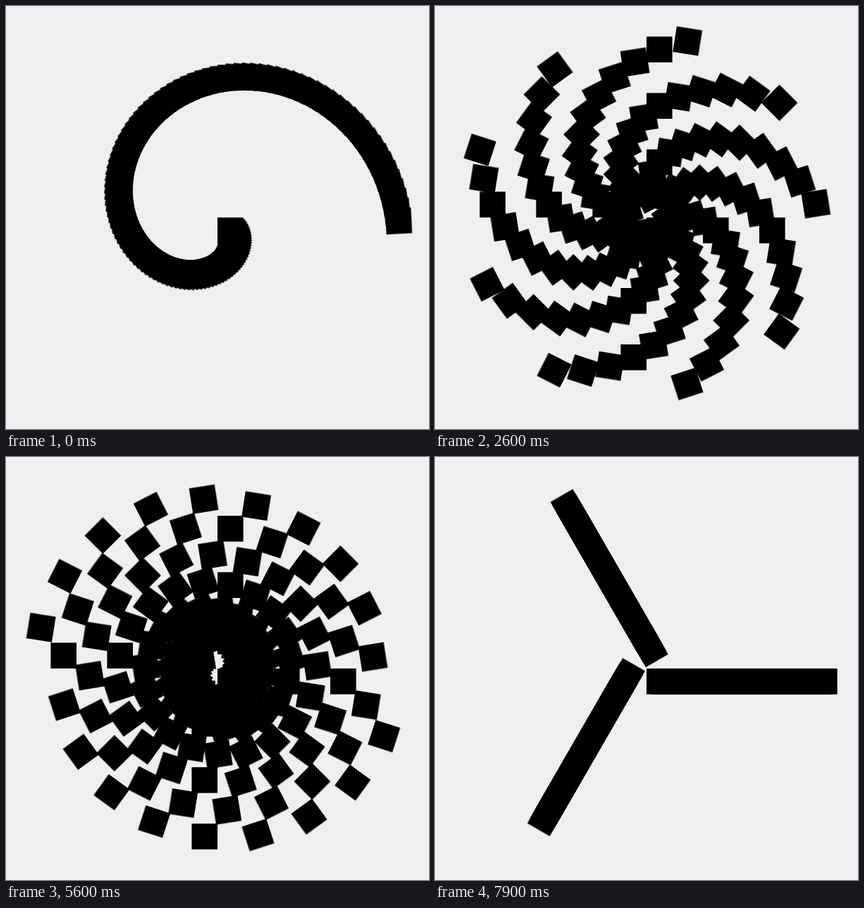
Write an HTML page without scripts that moves like this. It is 600 px wide and 600 px high and loops after 8 s.

```html
<!DOCTYPE html>
<html lang="en">
<head>
<meta charset="utf-8">
<title>Turning squares</title>
<style>
  html, body { margin: 0; width: 100%; height: 100%; overflow: hidden; background: #f0eef1; }
  svg { display: block; width: 100%; height: 100%; }

  /* Square i sits 2i from the centre, turned i times the shared angle. */
  rect {
    --u: 0;
    --i: calc(var(--t) + var(--u));
    x: calc(var(--i) * 2px);
    width: 36.6px;
    height: 36.6px;
    transform-origin: 0 0;
    animation: turn 8s steps(80) -5ms infinite;
  }
  rect:nth-child(2) { --u: 1; }
  rect:nth-child(3) { --u: 2; }
  rect:nth-child(4) { --u: 3; }
  rect:nth-child(5) { --u: 4; }
  rect:nth-child(6) { --u: 5; }
  rect:nth-child(7) { --u: 6; }
  rect:nth-child(8) { --u: 7; }
  rect:nth-child(9) { --u: 8; }
  rect:nth-child(10) { --u: 9; }

  /* The shared angle grows 3 degrees per step. */
  @keyframes turn {
    from { transform: rotate(calc(var(--i) * 3deg)); }
    to { transform: rotate(calc(var(--i) * 243deg)); }
  }
</style>
</head>
<body>
<svg viewBox="0 0 600 600">
  <g transform="translate(300 300)">
    <g style="--t:0"><rect/><rect/><rect/><rect/><rect/><rect/><rect/><rect/><rect/><rect/></g>
    <g style="--t:10"><rect/><rect/><rect/><rect/><rect/><rect/><rect/><rect/><rect/><rect/></g>
    <g style="--t:20"><rect/><rect/><rect/><rect/><rect/><rect/><rect/><rect/><rect/><rect/></g>
    <g style="--t:30"><rect/><rect/><rect/><rect/><rect/><rect/><rect/><rect/><rect/><rect/></g>
    <g style="--t:40"><rect/><rect/><rect/><rect/><rect/><rect/><rect/><rect/><rect/><rect/></g>
    <g style="--t:50"><rect/><rect/><rect/><rect/><rect/><rect/><rect/><rect/><rect/><rect/></g>
    <g style="--t:60"><rect/><rect/><rect/><rect/><rect/><rect/><rect/><rect/><rect/><rect/></g>
    <g style="--t:70"><rect/><rect/><rect/><rect/><rect/><rect/><rect/><rect/><rect/><rect/></g>
    <g style="--t:80"><rect/><rect/><rect/><rect/><rect/><rect/><rect/><rect/><rect/><rect/></g>
    <g style="--t:90"><rect/><rect/><rect/><rect/><rect/><rect/><rect/><rect/><rect/><rect/></g>
    <g style="--t:100"><rect/><rect/><rect/><rect/><rect/><rect/><rect/><rect/><rect/><rect/></g>
    <g style="--t:110"><rect/><rect/><rect/><rect/><rect/><rect/><rect/><rect/><rect/><rect/></g>
  </g>
</svg>
</body>
</html>
```
